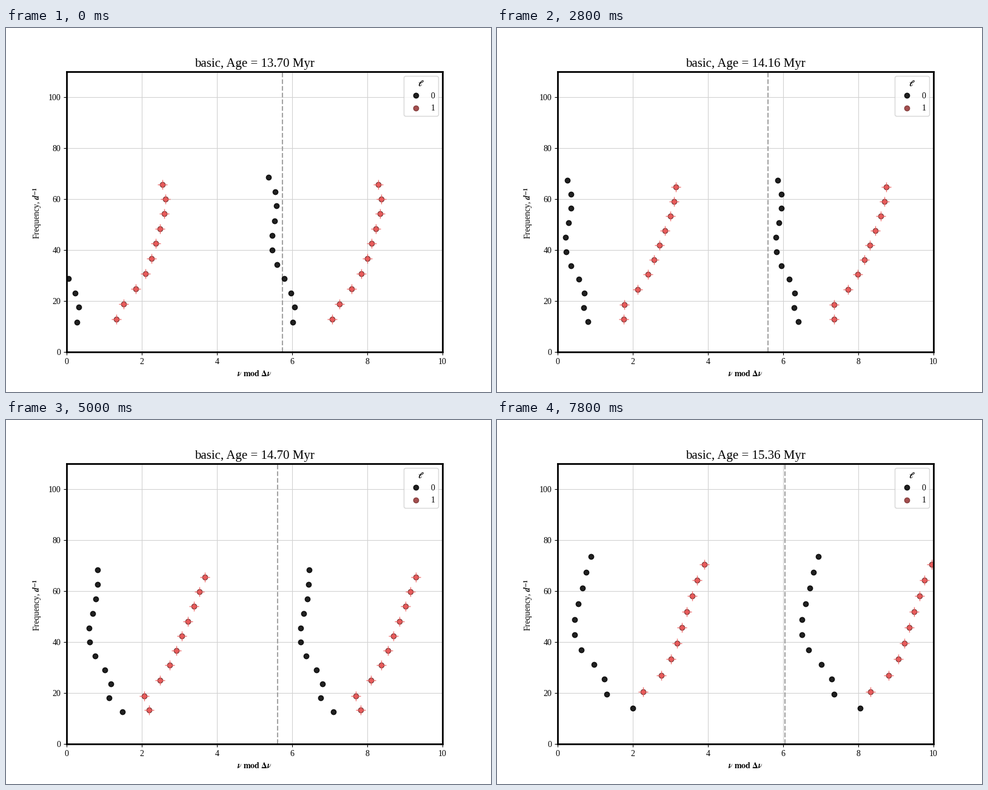
A matplotlib script that plays this animation: 800 by 600 pixels, repeating every 8000 ms.

```python
import numpy as np
import matplotlib.pyplot as plt
from matplotlib.animation import FuncAnimation
from matplotlib.lines import Line2D

plt.rcParams.update({
    "font.family": "Liberation Serif",
    "mathtext.fontset": "stix",
    "font.size": 10,
    "axes.linewidth": 2,
})

FRAMES, STEP = 40, 200
PX = 62  # pixels per unit on the x axis
MIDDLE = 0.47  # phase at which the bend of a ridge peaks
LAST_LOW_DIPOLE = 31  # the lowest l = 1 mode is lost after this step

KEYS = np.array([0, 6, 14, 21, 29, 35, 39])
AGE = np.array([13.70, 13.88, 14.16, 14.48, 14.92, 15.23, 15.36])


def age_at(t):
    """Cubic Hermite curve through the key ages."""
    slope = np.gradient(AGE, KEYS, edge_order=2)
    k = min(np.searchsorted(KEYS, t, side="right") - 1, len(KEYS) - 2)
    h = KEYS[k + 1] - KEYS[k]
    u = (t - KEYS[k]) / h
    return (AGE[k] * (1 + 2 * u) * (1 - u) ** 2 + AGE[k + 1] * u * u * (3 - 2 * u)
            + h * u * (1 - u) * (slope[k] * (1 - u) - slope[k + 1] * u))


def bump(n, centre, width):
    return np.exp(-((n - centre) / width) ** 2)


def evolve(start, drift, bend, skew, u):
    """Ridge offset at phase u, from its start, net drift and bend in pixels."""
    arc = u * (1 - u)
    return (start + drift * u + bend * arc / (MIDDLE * (1 - MIDDLE))
            + skew * arc * (u - MIDDLE)) / PX


def spacing(u):
    return (356 - 46.4 * u + 42.9 * u**2 + 22.5 * u**3) / PX


def radial_ridge(n, u):
    start = (16.4 - 4 * (n - 2) - 0.35 * (n - 7) ** 2
             + 13 * np.cos(np.pi * (n - 3) / 4))
    drift = (44 + 62 * np.exp(-2 * (n - 2)) + 34 * np.exp((n - 12) / 1.2)
             + 18 * bump(n, 4.2, 1.4))
    bend = 26 - 18 * bump(n, 2, 2)
    return evolve(start, drift, bend, 78, u)


def dipole_ridge(n, u):
    low = np.exp(-2 * (n - 2))
    start = (160 - 1.6 * (n - 9.5) ** 2 + 15 * low
             + 3 * np.cos(2 * np.pi * (n - 4.5) / 5.5))
    drift = 57 + 27 * np.exp(n - 11) + 14 * low - 12 * bump(n, 3, 0.6)
    bend = 4 + 0.234 * (n - 3) ** 2 + 7 * low
    return evolve(start, drift, bend, 37, u)


def echelle(ridge, n, u):
    """Both copies of the modes in the folded diagram."""
    dnu = spacing(u)
    offset = ridge(n, u)
    x = offset % dnu
    return np.concatenate([x, x + dnu]), np.tile(n * dnu + offset, 2)


fig = plt.figure(figsize=(8, 6), dpi=100, facecolor="white")
ax = fig.add_axes([0.125, 0.11, 0.775, 0.77])
ax.set(xlim=(0, 10), ylim=(0, 110),
       xticks=range(0, 11, 2), yticks=range(0, 101, 20))
ax.set_axisbelow(True)
ax.grid(color="#d2d2d2", lw=0.8)
title = ax.set_title("", fontsize=15)
fig.text(0.5125, 26 / 600, ha="center", va="baseline",
         s=r"$\boldsymbol{\nu}\ \mathbf{mod}\ \boldsymbol{\Delta\nu}$")
fig.text(56 / 800, 0.4925, r"Frequency, $\mathbfit{d}^{\mathbf{-1}}$",
         rotation=90, rotation_mode="anchor", ha="center", va="baseline")

DOT = dict(ls="", marker="o", ms=6, mew=1)
BLACK = dict(DOT, color="black", alpha=0.87)
BROWN = dict(DOT, mfc="#a54f4f", mec="#85403f")
RED = dict(ls="", color="#ee5c5c", alpha=0.85)

fold = ax.axvline(0, color="#a3a3a3", lw=1.5, ls="--", zorder=0.9)
radial, = ax.plot([], [], zorder=2, **BLACK)
dipole = [
    ax.plot([], [], zorder=2.1, **BROWN)[0],
    ax.plot([], [], marker="+", ms=12, mew=1, zorder=2.2, **RED)[0],
    ax.plot([], [], marker="o", ms=5, mew=0, zorder=2.3, **RED)[0],
]
ax.legend([Line2D([], [], **BLACK), Line2D([], [], **BROWN)], ["0", "1"],
          title=r"$\boldsymbol{\ell}$", loc="upper right", labelspacing=0.54)


def draw(i):
    age = age_at(i)
    u = (age - AGE[0]) / (AGE[-1] - AGE[0])
    title.set_text(f"basic, Age = {age:.2f} Myr")
    fold.set_xdata([spacing(u)] * 2)
    radial.set_data(*echelle(radial_ridge, np.arange(2, 13), u))
    lowest = 3 if i > LAST_LOW_DIPOLE else 2
    points = echelle(dipole_ridge, np.arange(lowest, 12), u)
    for layer in dipole:
        layer.set_data(*points)
    return [title, fold, radial, *dipole]


anim = FuncAnimation(fig, draw, frames=FRAMES, interval=STEP,
                     repeat=True, repeat_delay=0, blit=False)
plt.show()
```
